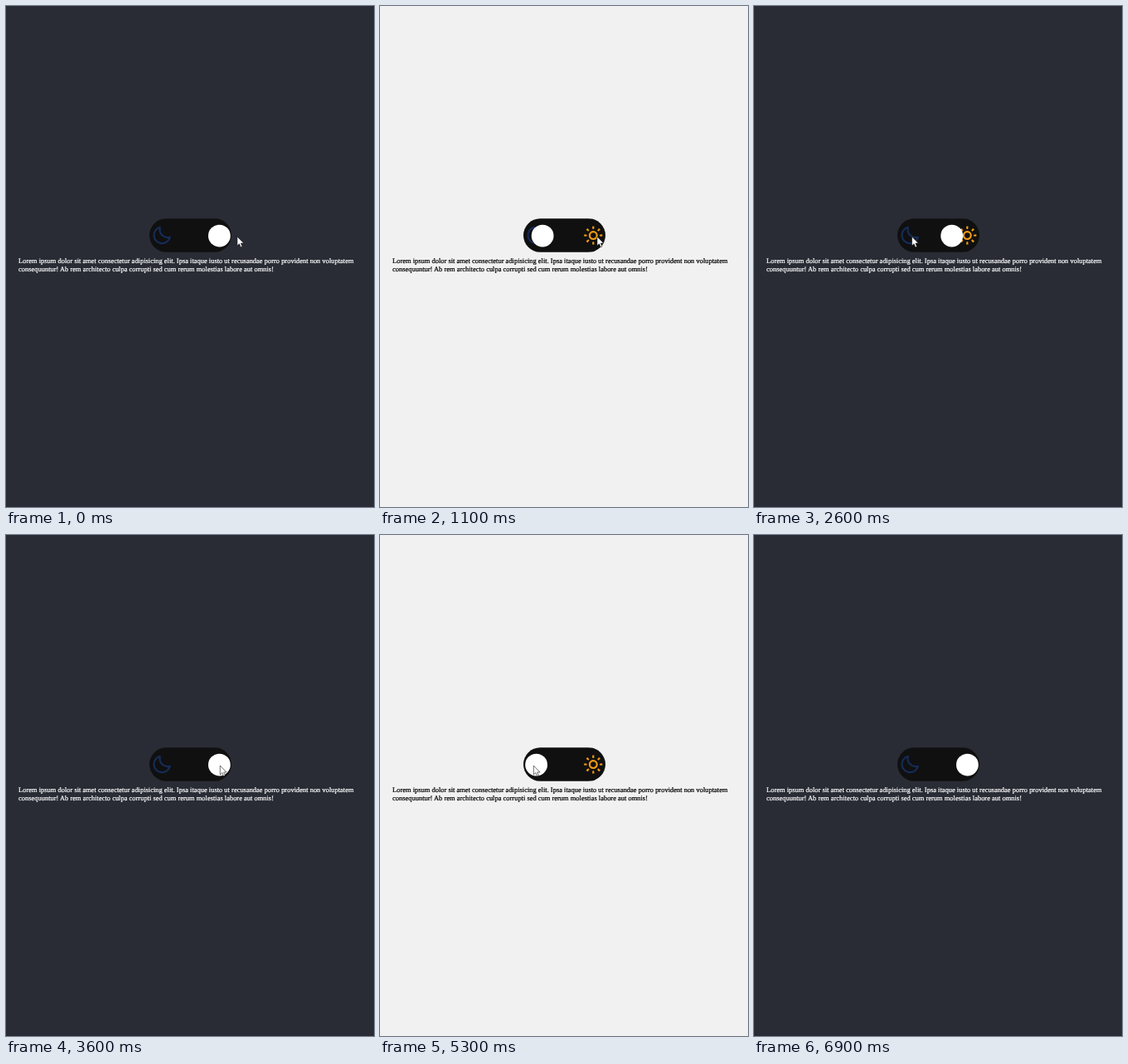
An HTML page for the animation above (7.1 s loop, 444 px wide and 604 px high).

```html
<!DOCTYPE html>
<html lang="en">
<head>
<meta charset="utf-8">
<title>Theme toggle</title>
<style>
  html, body { margin: 0; width: 100%; height: 100%; overflow: hidden; background: #292c35; }
  svg { display: block; width: 444px; height: 604px; }
  text {
    font: 8.463px "Liberation Serif", "Times New Roman", serif;
    fill: currentColor;
    stroke: currentColor;
    stroke-width: .22;
    text-rendering: geometricPrecision;
  }
  .icon { fill: none; stroke-width: 2; stroke-linejoin: round; }
  .moon { stroke: #152c58; }
  .sun { stroke: #f39c12; }
</style>
</head>
<body>
<svg id="stage" viewBox="0 0 444 604">
  <rect x="173" y="256.2" width="99" height="40.6" rx="20.3" fill="#101010"/>
  <path class="icon moon" transform="translate(174.8 263.4) scale(1.1)"
    d="M10 3A9 9 0 1 0 21 14A9 9 0 0 1 10 3Z"/>
  <g class="icon sun" transform="translate(257.3 276.6) scale(1.1)">
    <circle r="4"/>
    <circle r="8.5" stroke-width="3" pathLength="8" stroke-dasharray=".3 .7" stroke-dashoffset=".15"/>
  </g>
  <circle id="knob" cy="277.1" r="13.4" fill="#fff"/>
  <text x="15" y="310">Lorem ipsum dolor sit amet consectetur adipisicing elit. Ipsa itaque iusto ut recusandae porro provident non voluptatem</text>
  <text x="15" y="320">consequuntur! Ab rem architecto culpa corrupti sed cum rerum molestias labore aut omnis!</text>
  <path id="cursor" d="M0 0V11L2.5 8.7 4.2 12.7 6 11.9 4.4 8H7.8Z" fill="#fff" stroke="#111" stroke-width=".6"/>
</svg>
<script>
  const LOOP = 7100, TICK = 100, LEAD = 20;
  const FADE = 205, SLIDE = 320;
  const DARK = { bg: [41, 44, 53], ink: [255, 255, 255], knob: 257.4 };
  const LIGHT = { bg: [241, 241, 241], ink: [0, 0, 0], knob: 188.6 };

  // Every click flips the theme, starting from dark.
  const clicks = [815, 2367, 4115, 5967];

  const home = { x: 279, y: 278 };
  const moves = [
    { from: 0, to: 400, x: 262 },
    { from: 1200, to: 2100, x: 190.5 },
    { from: 2900, to: 3600, x: 258.3, bend: 10 },
    { from: 4500, to: 5300, x: 185.3, bend: -5 },
    { from: 6400, to: 6900, x: 220, y: -14 }
  ];

  const stage = document.getElementById("stage");
  const knob = document.getElementById("knob");
  const cursor = document.getElementById("cursor");

  const clamp = v => Math.min(1, Math.max(0, v));
  const mix = (a, b, p) => a + (b - a) * p;
  const mixColor = (a, b, p) => `rgb(${a.map((v, i) => Math.round(mix(v, b[i], p)))})`;
  const easeOut = p => Math.sin(p * Math.PI / 2);

  // 0 is dark, 1 is light.
  const level = (t, duration) => clicks.reduce((sum, start, i) =>
    sum + (i % 2 ? -1 : 1) * clamp((t - start) / duration), 0);

  function pointer(t) {
    let { x, y } = home;
    for (const move of moves) {
      const p = easeOut(clamp((t - move.from) / (move.to - move.from)));
      x = mix(x, move.x, p);
      y = mix(y, move.y ?? home.y, p) + (move.bend ?? 0) * Math.sin(p * Math.PI);
    }
    return [x, y];
  }

  function draw(t) {
    const light = level(t, FADE);
    stage.style.background = mixColor(DARK.bg, LIGHT.bg, light);
    stage.style.color = mixColor(DARK.ink, LIGHT.ink, light);
    knob.setAttribute("cx", mix(DARK.knob, LIGHT.knob, level(t, SLIDE)));
    cursor.setAttribute("transform", `translate(${pointer(t)})`);
  }

  const begin = performance.now();
  function frame() {
    const t = (performance.now() - begin + LEAD) % LOOP;
    draw(Math.floor(t / TICK) * TICK);
    requestAnimationFrame(frame);
  }
  frame();
</script>
</body>
</html>
```
